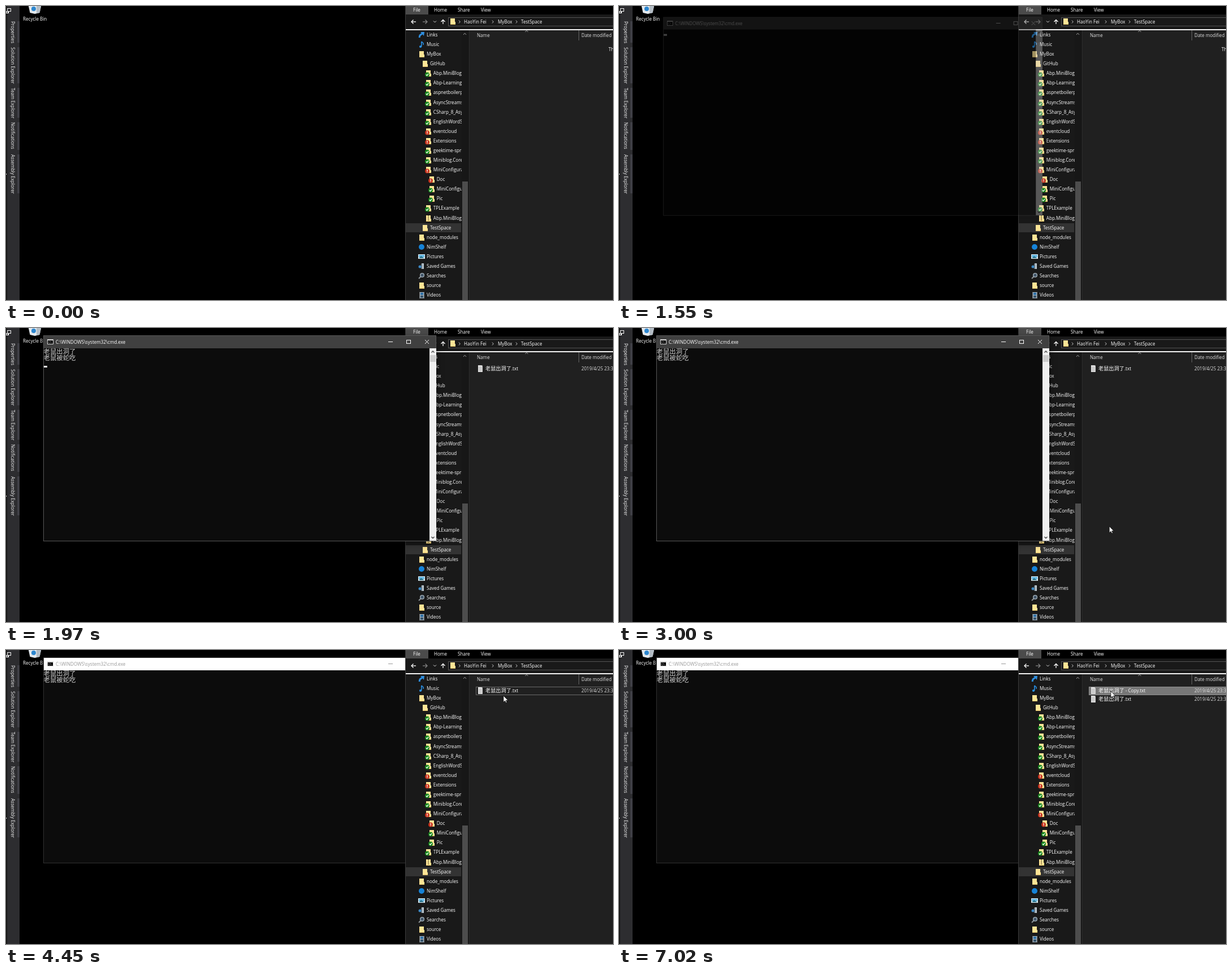
Animation, 1075 px wide and 521 px high, one loop 8000 ms. Source, as an HTML page with a canvas:

```html
<!DOCTYPE html>
<html lang="en">
<head>
<meta charset="utf-8">
<title>Desktop with console and file explorer</title>
<style>
html, body { margin: 0; width: 100%; height: 100%; overflow: hidden; background: #000; }
canvas { display: block; }
</style>
</head>
<body>
<canvas id="stage" width="1075" height="521"></canvas>
<script>
const W = 1075, H = 521, LOOP = 8000;
const screen2d = document.getElementById('stage').getContext('2d');
const layer = () => Object.assign(document.createElement('canvas'), { width: W, height: H }).getContext('2d');
const consoleLayer = layer();
let g = screen2d;

// Moments of the story, in ms
const OPEN = 1550, PRINTED = 1730, FILE_SHOWN = 1970, FOCUS_EXPLORER = 3380,
      FIRST_RELEASE = 3500, HOVER = 4520, SELECT = 4770, SECOND_RELEASE = 4890, COPIED = 7020;
const FILE = '老鼠出洞了';

function rect(x, y, w, h, color) { g.fillStyle = color; g.fillRect(x, y, w, h); }
function frame(x, y, w, h, color) {
  g.strokeStyle = color; g.lineWidth = 1;
  g.strokeRect(x + .5, y + .5, w - 1, h - 1);
}
function disc(x, y, r, color) {
  g.fillStyle = color; g.beginPath(); g.arc(x, y, r, 0, 7); g.fill();
}
function trace(points) {
  g.beginPath();
  for (let i = 0; i < points.length; i += 2) g.lineTo(points[i], points[i + 1]);
}
function line(points, color, width = 1) {
  trace(points); g.strokeStyle = color; g.lineWidth = width; g.stroke();
}
function poly(points, color) { trace(points); g.closePath(); g.fillStyle = color; g.fill(); }
function text(s, x, y, color = '#fff', size = 8.1, weight = 400) {
  g.font = `${weight} ${size}px "Open Sans", "Noto Sans CJK SC", "Noto Sans CJK", sans-serif`;
  g.fillStyle = color;
  g.fillText(s, x, y);
  return x + g.measureText(s).width;
}
function at(x, y, draw) { g.save(); g.translate(x, y); draw(); g.restore(); }

function folder() {
  rect(-4, -5, 8, 11, '#ffe596');
  rect(3, 1, 2, 5, '#ffe596');
  rect(-4, 5, 9, 1, '#e9c46a');
}
function badge(color) {
  disc(-2, 2.5, 3.9, color);
}
const icons = {
  folder,
  ok() { folder(); badge('#16881c'); line([-4, 2.5, -2.5, 4.2, .2, .8], '#fff', 1.2); },
  changed() { folder(); badge('#c8321c'); rect(-2.6, 0, 1.3, 3, '#fff'); rect(-2.6, 3.8, 1.3, 1.2, '#fff'); },
  zip() { folder(); for (let y = -5; y < 5; y += 2) rect(-1, y, 2, 1, '#665a35'); },
  links() { line([-4, 5, -3, 1, 1, -2], '#2f8fe0', 3); poly([-2, -5, 5, -5, 4, 2], '#2f8fe0'); },
  music() { rect(-1, -5, 1.6, 9, '#2b92e8'); disc(-2, 4, 2.1, '#2b92e8'); line([0, -5, 3, -2, 3, 1], '#2b92e8', 1.5); },
  cloud() { disc(0, 0, 5, '#1683d8'); },
  pictures() { rect(-6, -4, 12, 8, '#e9f4fa'); rect(-5, -3, 10, 4, '#65b8e4'); poly([-5, 3, -1, -1, 5, 3], '#2f7890'); },
  games() { rect(0, -5, 4, 10, '#b9c5cc'); rect(-1, -4, 2, 9, '#667783'); disc(-3, 1, 2.5, '#3d88c3'); },
  search() { line([-5, 5, -1, 1], '#8c9297', 2); disc(1, -1, 4, '#a6b3bc'); disc(1, -1, 2.7, '#42566a'); },
  videos() {
    rect(-4, -5, 9, 11, '#a8b4bd'); rect(-2, -4, 5, 4, '#2d70a8'); rect(-2, 1, 5, 4, '#36546c');
    for (let y = -4; y < 6; y += 2) { rect(-4, y, 1, 1, '#222'); rect(4, y, 1, 1, '#222'); }
  }
};

// Label, depth, icon
const TREE = [
  ['Links', 0, 'links'], ['Music', 0, 'music'], ['MyBox', 0, 'folder'], ['GitHub', 1, 'folder'],
  ['Abp.MiniBlog', 2, 'ok'], ['Abp-Learning', 2, 'ok'], ['aspnetboilerplate', 2, 'ok'],
  ['AsyncStreams', 2, 'ok'], ['CSharp_8_Async', 2, 'ok'], ['EnglishWordStudy', 2, 'ok'],
  ['eventcloud', 2, 'changed'], ['Extensions', 2, 'changed'], ['geektime-spring', 2, 'ok'],
  ['Miniblog.Core', 2, 'ok'], ['MiniConfiguration', 2, 'changed'], ['Doc', 3, 'changed'],
  ['MiniConfiguration', 3, 'ok'], ['Pic', 3, 'ok'], ['TPLExample', 2, 'ok'], ['Abp.MiniBlog', 2, 'zip'],
  ['TestSpace', 1, 'folder'], ['node_modules', 0, 'folder'], ['NimShelf', 0, 'cloud'],
  ['Pictures', 0, 'pictures'], ['Saved Games', 0, 'games'], ['Searches', 0, 'search'],
  ['source', 0, 'folder'], ['Videos', 0, 'videos']
];

function drawDesktop() {
  rect(0, 0, W, H, '#000');
  rect(0, 0, 24, H, '#2d2d30');
  rect(0, 0, 2, H, '#141414');
  rect(0, 297, 1, 2, '#ddd');
  frame(2, 4, 7, 6, '#f4f4f4');
  rect(0, 9, 5, 4, '#f4f4f4');
  rect(1, 10, 2, 2, '#222');
  const tabs = [['Properties', 27, 65], ['Solution Explorer', 73, 137], ['Team Explorer', 145, 198],
                ['Notifications', 206, 255], ['Assembly Explorer', 263, 332]];
  for (const [label, top, bottom] of tabs) {
    rect(20, top, 4, bottom - top, '#3f3f46');
    at(9, top, () => { g.rotate(Math.PI / 2); text(label, 0, 0, '#f4f4f4'); });
  }
  poly([39, -4, 63, -4, 59.5, 12, 51, 14, 42.5, 12], '#e3e8ec');
  poly([54, -4, 63, -4, 59.5, 12, 54, 13], '#b4bdc5');
  disc(49, 5, 4, '#2c86cf');
  text('Recycle Bin', 30, 26);
}

function drawTree() {
  rect(708, 43, 112, H, '#191919');
  rect(708, 385, 98, 16, '#333');
  g.save();
  g.beginPath(); g.rect(708, 43, 99, H); g.clip();
  TREE.forEach(([label, depth, icon], i) => {
    const x = 745 + depth * 5.9, y = 51 + i * 17.08;
    at(Math.round(x - 9), Math.round(y), icons[icon]);
    text(label, x, Math.round(y) + 3);
  });
  g.restore();
  rect(807, 43, 12, H, '#171717');
  rect(808, 311, 10, H, '#4d4d4d');
  line([810, 51, 812.5, 48, 815, 51], '#999');
  rect(820, 43, 1, H, '#2b2b2b');
}

function drawFile(y, suffix) {
  rect(836, y - 6, 8, 12, '#dedede');
  poly([842, y - 6, 844, y - 6, 844, y - 4], '#8a8a8a');
  for (let k = -3; k < 5; k += 2) rect(837, y + k, 6, .7, '#aaa');
  const end = text(FILE, 849, y + 3, '#fff', 9.2);
  text(suffix, end, y + 3);
  text('2019/4/25 23:35', 1019, y + 3, '#dedede');
}

function drawFiles(t) {
  if (t < FILE_SHOWN) { text('This folder is empty.', 1067, 80); return; }
  if (t >= SELECT) { rect(832, 65, 250, 15, '#777'); frame(832, 65, 250, 15, '#909090'); }
  else if (t >= FIRST_RELEASE) {
    if (t >= HOVER) rect(832, 65, 250, 15, '#4d4d4d');
    frame(832, 65, 250, 15, '#6a6a6a');
  }
  drawFile(72, t >= COPIED ? ' - Copy.txt' : '.txt');
  if (t >= COPIED) drawFile(87, '.txt');
}

function drawExplorer(t) {
  rect(707, 0, W, H, '#202020');
  rect(707, 0, W, 15, '#000');
  rect(708, 0, 40, 15, '#4b4b4b');
  [['File', 721], ['Home', 758], ['Share', 800], ['View', 841]].forEach(([s, x]) => text(s, x, 10));

  rect(708, 15, W, 26, '#191919');
  line([726, 28, 718, 28], '#fff', 1.3);
  line([721.5, 24.5, 718, 28, 721.5, 31.5], '#fff', 1.3);
  line([738, 28, 746, 28], '#8b8b8b', 1.2);
  line([742.5, 24.5, 746, 28, 742.5, 31.5], '#8b8b8b', 1.2);
  line([757, 26.5, 759.5, 29, 762, 26.5], '#ddd');
  line([774, 32, 774, 24.5], '#fff', 1.3);
  line([770.5, 28, 774, 24.5, 777.5, 28], '#fff', 1.3);
  frame(783, 20, 300, 16, '#535353');
  at(791, 27, folder);
  for (const x of [803, 862, 904]) line([x - 1, 25.5, x + 1.3, 28, x - 1, 30.5], '#ccc');
  text('HaoYin Fei', 811, 31);
  text('MyBox', 871, 31);
  text('TestSpace', 912, 31);
  rect(708, 41, W, 2, '#f4f4f4');

  drawTree();
  line([919.5, 46, 922, 43.5, 924.5, 46], '#aaa');
  text('Name', 834, 55, '#dedede');
  rect(1014, 43, 1, 18, '#636363');
  text('Date modified', 1019, 55, '#dedede');
  drawFiles(t);
  rect(707, 0, 1, H, '#3c3c3c');
}

function caretOn(t) {
  return t < 2550 || t >= 3080;
}

function paintConsole(t, active) {
  const ink = active ? '#fff' : '#999';
  g.clearRect(0, 0, W, H);
  rect(66, 13, 696, 365, active ? '#575757' : '#303030');
  rect(67, 14, 694, 22, active ? '#404040' : '#fff');
  rect(67, 36, 694, 341, '#0c0c0c');

  rect(73, 20, 11, 9, '#d8d8d8');
  rect(74, 22, 9, 6, '#000');
  text('C:\\', 75, 27, '#fff', 4.5);
  text('C:\\WINDOWS\\system32\\cmd.exe', 88, 28, ink);
  rect(677, 24, 8, 1, ink);
  frame(709, 21, 8, 7, ink);
  line([742, 21, 749, 28], ink);
  line([749, 21, 742, 28], ink);

  rect(750, 36, 12, 341, '#f0f0f0');
  rect(751, 48, 10, 12, '#cdcdcd');
  line([753.5, 43.5, 756, 41, 758.5, 43.5], '#444', 1.4);
  line([753.5, 370, 756, 372.5, 758.5, 370], '#444', 1.4);

  const printed = t >= PRINTED;
  if (printed) {
    text(FILE, 66.5, 46, '#ccc', 11.4, 300);
    text('老鼠被蛇吃', 66.5, 57.4, '#ccc', 11.4, 300);
  }
  if (active && caretOn(t)) rect(67, printed ? 67 : 44.5, 6, 3, '#f0f0f0');
}

function drawConsole(t) {
  if (t < OPEN) return;
  g = consoleLayer;
  paintConsole(t, t < FOCUS_EXPLORER);
  g = screen2d;

  // The window grows and fades in over five steps
  const step = Math.min(4, Math.floor((t - OPEN) / 60));
  const scale = 1 - .035 * (1 - step / 4) ** 2;
  g.save();
  g.globalAlpha = [.3, .6, .82, .94, 1][step];
  g.shadowColor = 'rgba(0,0,0,.4)';
  g.shadowBlur = 14;
  g.shadowOffsetY = 3;
  g.translate(414, 195.5);
  g.scale(scale, scale);
  g.drawImage(consoleLayer.canvas, -414, -195.5);
  g.restore();
}

// Time, x, y of the pointer's tip
const POINTER = [[2620, 845, 499], [3330, 887, 233], [3520, 887, 233], [4130, 884, 98],
                 [4300, 884, 98], [4450, 881, 81], [4630, 871, 73], [LOOP, 871, 73]];

function drawPointer(t) {
  if (t < POINTER[0][0]) return;
  const i = POINTER.findIndex(key => key[0] > t);
  const [t0, x0, y0] = POINTER[i - 1], [t1, x1, y1] = POINTER[i];
  const p = (t - t0) / (t1 - t0), ease = p * p * (3 - 2 * p);
  at(x0 + (x1 - x0) * ease, y0 + (y1 - y0) * ease, () => {
    const pressed = t >= FOCUS_EXPLORER && t < FIRST_RELEASE || t >= SELECT && t < SECOND_RELEASE;
    if (pressed) disc(0, -1, 9, 'rgba(255,245,0,.6)');
    poly([0, 0, 0, 11.5, 2.7, 9, 4.5, 12.6, 6.2, 11.8, 4.5, 8.3, 8, 8.3], '#fff');
    g.strokeStyle = '#000'; g.lineWidth = .7; g.stroke();
  });
}

function render(now) {
  const t = now % LOOP;
  drawDesktop();
  const layers = [() => drawExplorer(t), () => drawConsole(t)];
  if (t >= FOCUS_EXPLORER) layers.reverse();
  layers.forEach(draw => draw());
  drawPointer(t);
}

const start = performance.now();
function tick() {
  render(performance.now() - start);
  requestAnimationFrame(tick);
}
tick();
</script>
</body>
</html>
```
